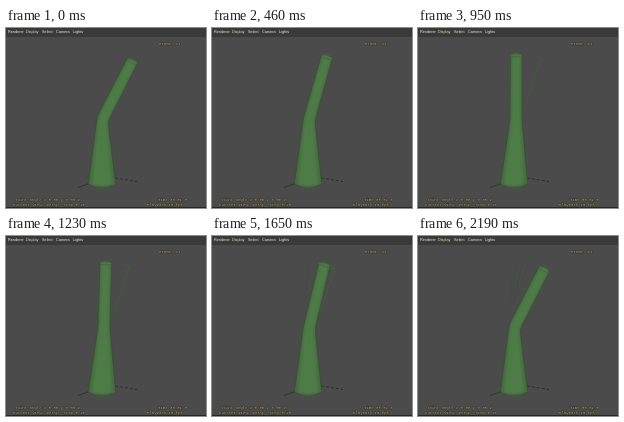
Write an HTML page that moves like this. It is 200 by 180 pixels and loops after 2260 ms.

```html
<!DOCTYPE html>
<html lang="en">
<head>
<meta charset="utf-8">
<title>Bending arm</title>
<style>
html, body { margin: 0; width: 100%; height: 100%; overflow: hidden; background: #4b4b4b; }
svg { display: block; width: 200px; height: 180px; }
.menu { font: 3.8px "Liberation Sans", Arial, sans-serif; fill: #f0f0e6; }
.hud { font: 4px "Liberation Mono", "DejaVu Sans Mono", monospace; fill: #bdb570; stroke: #25241c; stroke-width: .6; paint-order: stroke; white-space: pre; }
.ghost { fill: none; stroke-width: .8; }
</style>
</head>
<body>
<svg viewBox="0 0 200 180">
  <defs>
    <filter id="soft"><feGaussianBlur stdDeviation="1.3"/></filter>
  </defs>
  <rect width="200" height="180" fill="#4b4b4b"/>
  <rect width="200" height="9" fill="#3a3a3a"/>
  <rect y="179" width="200" height="1" fill="#262626"/>
  <g class="menu">
    <text x="2" y="5.4">Renderer</text>
    <text x="20" y="5.4" fill="#e6dfa0">Display</text>
    <text x="36" y="5.4">Select</text>
    <text x="50" y="5.4">Camera</text>
    <text x="67" y="5.4">Lights</text>
  </g>
  <path d="M72 159.5L83 155.5" stroke="#2c2c2c" stroke-width=".8"/>
  <path d="M109 150L131 153.5" stroke="#262626" stroke-width=".8" stroke-dasharray="3 2"/>
  <g id="ghosts"></g>
  <path id="arm" fill="#446e3e" stroke="#34502f" stroke-width=".7" stroke-linejoin="round"/>
  <path id="core" fill="#4e7c47" filter="url(#soft)"/>
  <path id="cap" fill="#4c7845" stroke="#3c6036" stroke-width=".5"/>
  <g class="hud">
    <text x="153" y="16.8">Frame: 24</text>
    <text x="9" y="172.6">Joint angle  x 0.00  y 0.00 z</text>
    <text x="7" y="177.6">Current view: persp, step 0.10</text>
    <text x="152" y="172.6">Time 00:01.0</text>
    <text x="141" y="177.6">Playback 15 fps.</text>
  </g>
</svg>
<script>
const LOOP = 2260, STEP = 68.4, LAST = 32, REACH = 64.6;
// [ms, degrees from upright]
const bend = [[0, 27], [270, 19.8], [680, 8], [950, .4], [1060, -1.5], [1180, .2],
  [1440, 7.5], [1840, 19.3], [2120, 26.6], [2190, 27], [2260, 27]];
// [start, end, colour, path]
const trails = [
  [475, 1720, "#40603c", "M118 28L123 31L108 76"],
  [1510, LOOP, "#424d40", "M96 29L92 68"],
  [1580, LOOP, "#424d40", "M99 30L93 66"],
  [1650, LOOP, "#414b3f", "M104 30L95 68"],
  [1910, LOOP, "#424d40", "M110 29L97 66"]
];

const byId = id => document.getElementById(id);
const arm = byId("arm"), core = byId("core"), cap = byId("cap");
const ghosts = trails.map(([, , colour, d]) => {
  const path = document.createElementNS("http://www.w3.org/2000/svg", "path");
  path.setAttribute("class", "ghost");
  path.setAttribute("stroke", colour);
  path.setAttribute("d", d);
  byId("ghosts").append(path);
  return path;
});

const mix = (p, q, k) => p.map((v, i) => v + (q[i] - v) * k);

function angleAt(t) {
  const i = Math.max(1, bend.findIndex(([ms]) => ms >= t));
  const [t0, a0] = bend[i - 1], [t1, a1] = bend[i];
  return a0 + (a1 - a0) * (t - t0) / (t1 - t0);
}

function draw(t) {
  const deg = angleAt(t), a = deg * Math.PI / 180;
  const sin = Math.sin(a), cos = Math.cos(a);
  const elbow = [98 - 3 * sin, 92 - 2 * sin];
  const at = (along, side) => [
    elbow[0] + sin * along + cos * side,
    elbow[1] - cos * along + sin * side
  ];

  // Outline of the limb, with its half-width scaled by k
  function outline(k) {
    const baseL = [96 - 13.6 * k, 155.5], baseR = [96 + 13.6 * k, 155.5];
    const foldL = at(0, -6 * k), foldR = at(0, 6 * k);
    return `M${baseL}L${mix(foldL, baseL, .07)}Q${foldL} ${at(4, -5.9 * k)}
      L${at(REACH, -5.7 * k)}A${5.7 * k} 1.6 ${deg} 0 1 ${at(REACH, 5.7 * k)}
      L${at(4, 5.9 * k)}Q${foldR} ${mix(foldR, baseR, .07)}L${baseR}
      A${13.6 * k} 3 0 0 1 ${baseL}Z`;
  }
  arm.setAttribute("d", outline(1));
  core.setAttribute("d", outline(.72));

  const tipL = at(REACH, -5.7), tipR = at(REACH, 5.7);
  cap.setAttribute("d", `M${tipL}A5.7 1.6 ${deg} 0 1 ${tipR}A5.7 1.6 ${deg} 0 1 ${tipL}Z`);

  ghosts.forEach((g, i) => {
    const [from, to] = trails[i];
    g.style.visibility = t >= from && t < to ? "visible" : "hidden";
  });
}

function tick() {
  const t = performance.now() % LOOP;
  draw(Math.min(LAST, Math.floor((t + 8) / STEP)) * STEP);
  requestAnimationFrame(tick);
}
tick();
</script>
</body>
</html>
```
